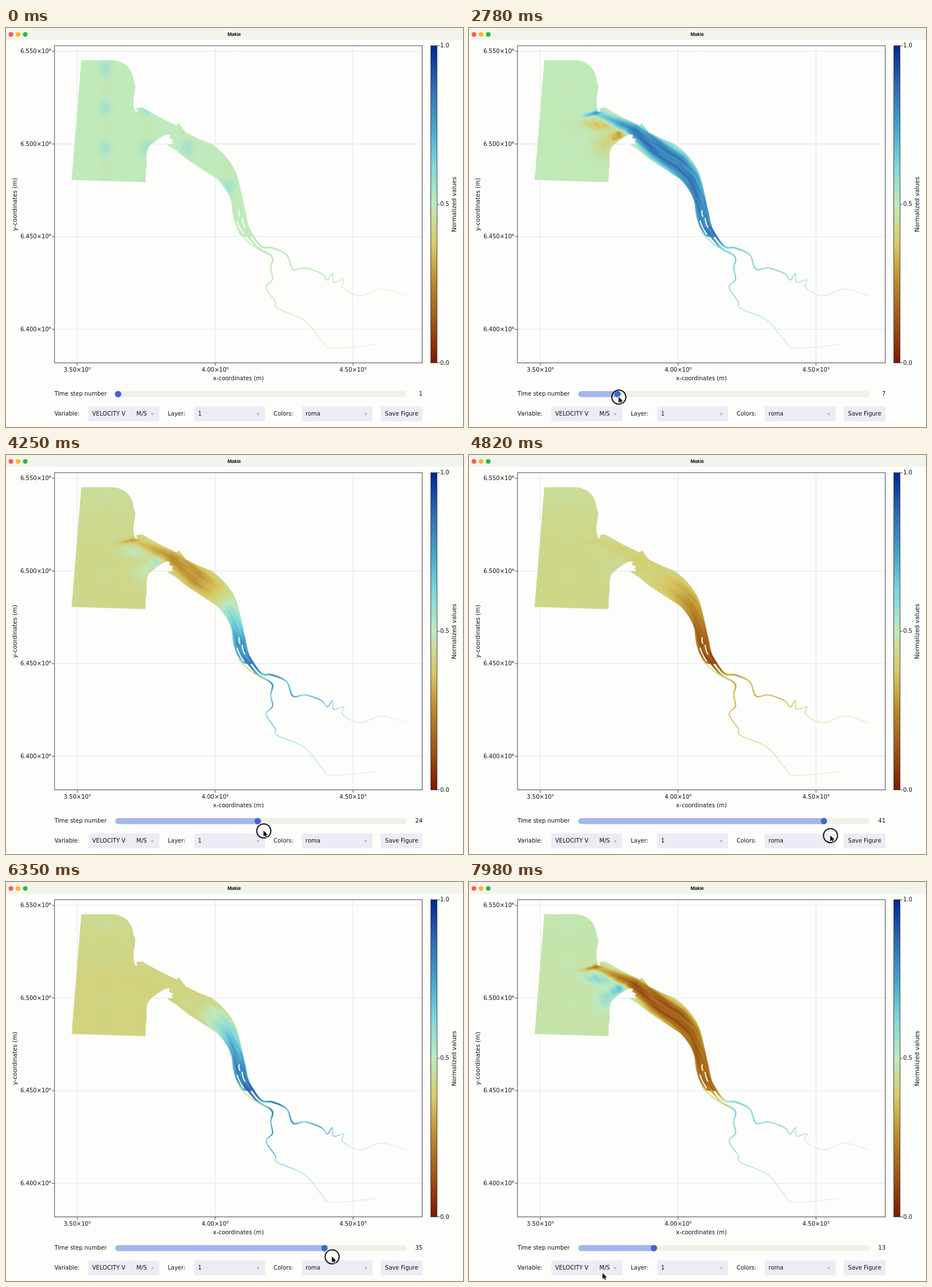
Animation, 801 px wide and 700 px high, one loop 8000 ms. Source, as an HTML page with a canvas:

```html
<!DOCTYPE html>
<html lang="en">
<head>
<meta charset="utf-8">
<title>Makie</title>
<style>
html, body { margin: 0; width: 100%; height: 100%; overflow: hidden; background: #fdfdfc; }
canvas { display: block; }
</style>
</head>
<body>
<canvas id="stage" width="801" height="700"></canvas>
<script>
const ctx = document.getElementById('stage').getContext('2d');
const LOOP = 8000, DRAG_LAG = 40;
const PRESS = 2300, RELEASE = 7350;
const FIRST_X = 196.5, STEP_W = 10.64, STEPS = 48;
const SANS = '"DejaVu Sans", sans-serif';
const PAPER = '#fdfdfc', INK = '#45454f', BUTTON = '#ececf4', GRID = '#e3e3f2';
const TAU = Math.PI * 2;

const clamp = (v, a = 0, b = 1) => Math.max(a, Math.min(b, v));
const mix = (a, b, f) => a + (b - a) * f;

// Colour map: evenly spaced stops from 0 to 1
const ROMA = ['#7e1700', '#9b5414', '#b8882a', '#d8c964', '#c0eabc', '#7dd6dc', '#47a0c8', '#2f68b0', '#032692']
  .map(c => [1, 3, 5].map(i => parseInt(c.slice(i, i + 2), 16)));
function shade(v) {
  const p = clamp(v) * (ROMA.length - 1), i = Math.min(Math.floor(p), ROMA.length - 2);
  return ROMA[i].map((a, j) => Math.round(mix(a, ROMA[i + 1][j], p - i)));
}
const css = v => `rgb(${shade(v)})`;

// Tide: the flood repeats every 12.5 steps, later and steeper upstream
const wave = (n, lag) => Math.cos(TAU * (n - 7 - lag) / 12.5);
function tide(n) {
  const c = wave(n, 0), spinUp = clamp((n - 1) / 4);
  return {
    sea: .456 + .044 * Math.cos(TAU * (n - 1) / 64),
    low: spinUp * Math.sign(c) * Math.abs(c) ** 1.4,
    high: spinUp * Math.tanh(4 * wave(n, 2.1)),
    river: spinUp * (.3 + .7 * wave(n, 3)),
    spots: mix(.055, .012, spinUp)
  };
}

// Sea and estuary outline, clockwise from the north-west corner
const coast = new Path2D(
  'M132 56.5H190Q221 62 224 94C231 104 221 118 224 137L226 146L231 147L228 141L238 139' +
  'L268 156L299 171L303 167L315 183L337 194L360 203Q396 229 406 262Q412 285 418 315' +
  'C424 335 422 350 436 366L428 367L414 366Q397 342 396 312Q394 290 370 265L318 231' +
  'L297 214L282 205L293 203L290 199L293 196L286 193L287 187H280Q262 196 250 209' +
  'C243 225 249 235 245 250L244.5 270.5L115 266.5Z');

const points = s => s.split(' ').map(p => p.split(',').map(Number));

// Estuary axis: x, y, half width
const AXIS = points('222,148,5 290,180,12 328,211,19 366,238,21 388,264,18 405,305,14 414,345,13 446,385,9');
const NORTH_RIVER = points('422,348 446,382 467,386 492,398 503,423 525,421 553,431 563,442 572,431 574,446 592,442 590,455 620,470 658,458 701,470');
const SOUTH_RIVER = points('413,350 440,384 466,401 464,421 467,441 456,455 472,480 476,492 523,513 553,548 572,562 650,555');

// Smooth curve through the key points
function smooth(keys, perSpan = 8) {
  const out = [];
  for (let i = 0; i < keys.length - 1; i++) {
    const [p, a, b, q] = [-1, 0, 1, 2].map(o => keys[clamp(i + o, 0, keys.length - 1)]);
    for (let j = 0; j < perSpan; j++) {
      const f = j / perSpan;
      out.push([0, 1].map(k => a[k] + .5 * f * (b[k] - p[k] +
        f * (2 * p[k] - 5 * a[k] + 4 * b[k] - q[k] + f * (3 * (a[k] - b[k]) + q[k] - p[k])))));
    }
  }
  out.push(keys[keys.length - 1]);
  return out;
}

// Nearest place on the axis: k along, d across, w half width
function locate(x, y) {
  let best = { dist: Infinity };
  for (let i = 0; i < AXIS.length - 1; i++) {
    const [ax, ay, aw] = AXIS[i], [bx, by, bw] = AXIS[i + 1];
    const ux = bx - ax, uy = by - ay;
    const f = clamp(((x - ax) * ux + (y - ay) * uy) / (ux * ux + uy * uy));
    const px = x - ax - ux * f, py = y - ay - uy * f;
    const dist = Math.hypot(px, py);
    if (dist < best.dist) {
      best = { dist, k: i + f, d: dist * Math.sign(ux * py - uy * px), w: mix(aw, bw, f) };
    }
  }
  return best;
}

function blob(x, y, rx, ry, tilt = 0) {
  const c = Math.cos(tilt), s = Math.sin(tilt);
  return Math.exp(-(((x * c + y * s) / rx) ** 2) - ((y * c - x * s) / ry) ** 2);
}

// Terms of the flow field that do not depend on the step
const GX = 112, GY = 53, CELL = 2, GW = 164, GH = 160;
function terms(x, y) {
  const { k, d, w, dist } = locate(x, y);
  const streak = .55 * Math.sin(d * .36 + 1.6 * Math.sin(k * 1.9)) + .45 * Math.sin(d * .85 + k * 3);
  const ripple = 1 + .25 * Math.sin(x * .31 + y * .2) * Math.sin(y * .47 - x * .12);
  const ridge = Math.cos(TAU * (y - 72) / 69);
  return {
    flow: clamp(.3 + .7 * k) * Math.exp(-((dist / w) ** 4)) * (1 + .17 * streak),
    up: clamp((k - 2.2) / 3.4),
    eddy: .22 * blob(x - 215, y - 151, 16, 3.5, -.22) - ripple * (
      .2 * blob(x - 262, y - 188, 15, 8, -.5) +
      .12 * blob(x - 226, y - 170, 26, 9, .15) +
      .08 * blob(x - 238, y - 206, 18, 18)),
    spot: Math.max(0, Math.cos(TAU * (x - 174) / 72)) ** 2 * (ridge > 0 ? ridge : ridge * .3),
    north: clamp((160 - y) / 100)
  };
}
const grid = Array.from({ length: GW * GH }, (_, i) =>
  terms(GX + (i % GW + .5) * CELL, GY + (Math.floor(i / GW) + .5) * CELL));

const fields = {};
function field(n) {
  if (fields[n]) return fields[n];
  const cv = document.createElement('canvas');
  cv.width = GW;
  cv.height = GH;
  const g = cv.getContext('2d'), img = g.createImageData(GW, GH);
  const { sea, low, high, spots } = tide(n);
  grid.forEach((c, i) => {
    const q = mix(low, high, c.up);
    const v = sea + c.flow * (.34 * q + (.48 - sea) * Math.abs(q)) + c.eddy * low +
              spots * c.spot + .3 * (.5 - sea) * c.north;
    img.data.set([...shade(v), 255], i * 4);
  });
  g.putImageData(img, 0, 0);
  return fields[n] = cv;
}

function line(x1, y1, x2, y2, color, width = 1) {
  ctx.strokeStyle = color;
  ctx.lineWidth = width;
  ctx.beginPath();
  ctx.moveTo(x1, y1);
  ctx.lineTo(x2, y2);
  ctx.stroke();
}

function drawRiver(pts, n) {
  const { sea, high, river } = tide(n);
  const last = pts.length - 1;
  ctx.lineCap = 'round';
  for (let i = 0; i < last; i++) {
    const f = i / last;
    const q = mix(high, river, clamp(f * 8)) * (1 - f * .8) * (.9 + .25 * Math.sin(i * .45));
    ctx.globalAlpha = mix(1, .6, clamp(f * 2 - .8));
    line(...pts[i], ...pts[i + 1], css(mix(sea, .5, .5) + .38 * q), mix(4.2, .9, Math.sqrt(f)));
  }
  ctx.globalAlpha = 1;
  ctx.lineCap = 'butt';
}

function rect(x, y, w, h, fill) {
  ctx.fillStyle = fill;
  ctx.fillRect(x, y, w, h);
}
function disc(x, y, r, fill) {
  ctx.fillStyle = fill;
  ctx.beginPath();
  ctx.arc(x, y, r, 0, TAU);
  ctx.fill();
}
function pill(x1, x2, fill) {
  ctx.fillStyle = fill;
  ctx.beginPath();
  ctx.roundRect(x1, 637, x2 - x1, 10.5, 5.2);
  ctx.fill();
}
function text(s, x, y, align = 'left', font = '10px ' + SANS) {
  ctx.font = font;
  ctx.textAlign = align;
  ctx.textBaseline = 'middle';
  ctx.fillStyle = '#111';
  ctx.fillText(s, x, y);
}
function upright(s, x, y) {
  ctx.save();
  ctx.translate(x, y);
  ctx.rotate(-Math.PI / 2);
  text(s, 0, 0, 'center', '10.5px ' + SANS);
  ctx.restore();
}

const ticks = [0, 1, 2, 3];
const XTICKS = ticks.slice(0, 3).map(i => [125 + i * 241.6, (3.5 + i * .5).toFixed(2) + '×10⁵']);
const YTICKS = ticks.map(i => [41 + i * 162.5, (6.55 - i * .05).toFixed(3) + '×10⁶']);

function drawWindow() {
  rect(0, 0, 801, 700, PAPER);
  rect(0, 0, 801, 21, '#f4f4ee');
  ['#fb5b50', '#f8b52c', '#2bb840'].forEach((c, i) => disc(8.7 + i * 12.5, 11.3, 4.1, c));
  text('Makie', 400, 11.5, 'center', 'bold 8px Inter, sans-serif');
  for (const [x] of XTICKS) line(x, 31, x, 588, GRID);
  for (const [y] of YTICKS) line(85, y, 730, y, GRID);
}

const rivers = [NORTH_RIVER, SOUTH_RIVER].map(r => smooth(r));
const islands = new Path2D('M409 320Q407 326 410 331M414 333Q415 344 419 350M405 338Q408 350 417 362');
function drawWater(n) {
  ctx.save();
  ctx.clip(coast);
  ctx.drawImage(field(n), GX, GY, GW * CELL, GH * CELL);
  ctx.restore();
  ctx.strokeStyle = PAPER;
  ctx.lineWidth = 2;
  ctx.stroke(islands);
  rivers.forEach(r => drawRiver(r, n));
  ctx.strokeStyle = css(mix(tide(n).sea, .5, .5) + .1 * tide(n).low);
  ctx.lineWidth = 1.6;
  ctx.stroke(sideArm);
}
const sideArm = new Path2D('M408 358Q424 380 458 396');

const bar = ctx.createLinearGradient(0, 588, 0, 31);
ROMA.forEach((c, i) => bar.addColorStop(i / (ROMA.length - 1), `rgb(${c})`));

function drawAxes() {
  ctx.strokeStyle = INK;
  ctx.lineWidth = 1;
  ctx.strokeRect(85, 31, 644.5, 556.5);
  for (const [x, s] of XTICKS) {
    line(x, 588, x, 592.5, INK);
    text(s, x, 600.5, 'center');
  }
  for (const [y, s] of YTICKS) {
    line(80.5, y, 85, y, INK);
    text(s, 79, y + .5, 'right');
  }
  text('x-coordinates (m)', 407.5, 615, 'center');
  upright('y-coordinates (m)', 16, 309.5);

  rect(744, 31, 11.5, 557, bar);
  ctx.strokeRect(744.5, 31, 11, 556.5);
  for (const v of [0, .5, 1]) {
    const y = mix(587.5, 31, v);
    line(755.5, y, 760, y, INK);
    text(v.toFixed(1), 761, y + .5);
  }
  upright('Normalized values', 786.5, 309.5);
}

function menu(x, s) {
  rect(x, 664, 124, 26, BUTTON);
  text(s, x + 6.5, 677.5);
  ctx.fillStyle = '#b4b4bc';
  ctx.beginPath();
  ctx.moveTo(x + 109.5, 676);
  ctx.lineTo(x + 114.5, 676);
  ctx.lineTo(x + 112, 680);
  ctx.fill();
}

function drawControls(n) {
  const x = FIRST_X + (n - 1) * STEP_W;
  text('Time step number', 85, 642.5);
  pill(191.5, 702, '#f0f0e6');
  pill(191.5, x + 4, '#a4b7ec');
  disc(x, 642.3, 5.6, '#4064d2');
  text(String(n), 730, 642.5, 'right');

  text('Variable:', 85, 677.5);
  menu(144.5, 'VELOCITY V');
  text('M/S', 228.5, 677.5);
  text('Layer:', 283.5, 677.5);
  menu(330, '1');
  text('Colors:', 469, 677.5);
  menu(518.5, 'roma');
  rect(657, 664, 73, 26, BUTTON);
  text('Save Figure', 693.5, 677.5, 'center');
}

// Pointer turning points: time, x, y
const PATH = points('1050,244,716 1430,234,686 2000,197,645 2300,197,644 2780,262,647 4250,451,659 ' +
  '5150,738,672 5420,498,653 5800,400,650 6350,571,657 6600,600,668 7250,324,651 7400,324,651 7980,477,683');
function pointer(t) {
  const i = clamp(PATH.findIndex(p => p[0] > t), 1, PATH.length - 1);
  const a = PATH[i - 1], b = PATH[i], f = clamp((t - a[0]) / (b[0] - a[0]));
  return [mix(a[1], b[1], f), mix(a[2], b[2], f)];
}

function stepAt(t) {
  const s = Math.min(t, RELEASE) - DRAG_LAG;
  if (s < PRESS) return 1;
  return clamp(Math.round((pointer(s)[0] - FIRST_X) / STEP_W) + 1, 1, STEPS);
}

const ARROW = new Path2D('M0 0V10.5L2.5 8.3L4.3 12L6.1 11.2L4.5 7.5H7.8Z');
function drawPointer(t) {
  if (t < PATH[0][0]) return;
  const [x, y] = pointer(t);
  if (t >= PRESS && t < RELEASE) {
    ctx.strokeStyle = '#111';
    ctx.lineWidth = 2;
    ctx.beginPath();
    ctx.arc(x + .5, y + .5, 12.3, 0, TAU);
    ctx.stroke();
  }
  ctx.save();
  ctx.translate(x, y);
  ctx.strokeStyle = '#fff';
  ctx.lineWidth = 1.6;
  ctx.stroke(ARROW);
  ctx.fillStyle = '#111';
  ctx.fill(ARROW);
  ctx.restore();
}

const start = performance.now();
function frame() {
  const t = (performance.now() - start) % LOOP;
  const n = stepAt(t);
  drawWindow();
  drawWater(n);
  drawAxes();
  drawControls(n);
  drawPointer(t);
  requestAnimationFrame(frame);
}
frame();
</script>
</body>
</html>
```
